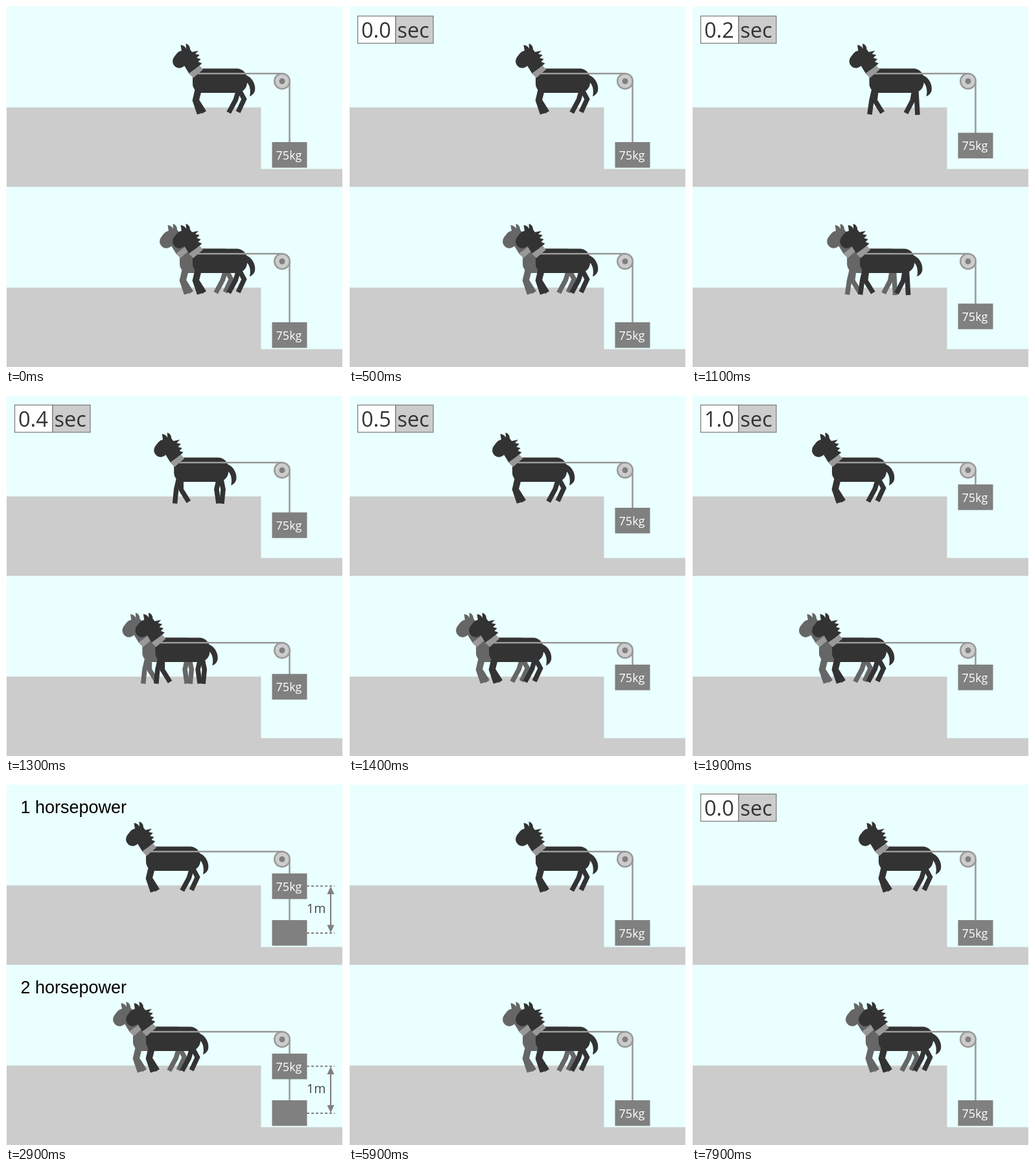
Recreate the animation shown at these times as an HTML page with a canvas. Size 520 by 557 pixels, loop 8 s.

```html
<!DOCTYPE html>
<html lang="en">
<head>
<meta charset="utf-8">
<title>Horsepower</title>
<style>
html, body { margin: 0; width: 100%; height: 100%; overflow: hidden; background: #fff; }
canvas { display: block; width: 520px; height: 557px; }
</style>
</head>
<body>
<canvas id="stage" width="520" height="557"></canvas>
<script>
const ctx = document.getElementById('stage').getContext('2d');
const LOOP = 8000, PANEL = 278, LIFT = 72, STRIDE = 5;
const SANS = '"Open Sans", "Noto Sans", sans-serif';
const ARIAL = '"Liberation Sans", Arial, sans-serif';
const DARK = '#333', MID = '#666', GREY = '#808080', ROPE = '#999', LIGHT = '#ccc', SKY = '#eaffff';

// Joint angle in degrees from straight down; positive swings backwards.
const swing = (mean, reach = 0, lag = 0) => phase => mean + reach * Math.cos(phase - lag);
const LEGS = [
  { hip: 296, thigh: swing(-13), shin: swing(0, 22, 0.57) },
  { hip: 299, thigh: swing(-7, -12, 0.94), shin: swing(32) },
  { hip: 360, thigh: swing(0, -24, 0.8), shin: swing(-8, -22.6, 0.42) },
  { hip: 358, thigh: swing(0, 36, 0.67), shin: swing(-17, -30, 1.3) }];

const HEAD = headShape();
const TAIL = new Path2D('M367 106C380 108 386 122 384 131Q382 137 376 139.5C379 127 374 117 367 115Z');
const COLLAR = new Path2D('M282 104L299 92L304 98L289 111Z');
const BODY = new Path2D();
BODY.roundRect(288, 96.5, 84, 37.5, [10, 16, 16, 14]);

function headShape() {
  const p = new Path2D('M275 92L271 70L269.5 60Q276 61 278 66L277.5 58Q284 60 284 67L287 71');
  for (let i = 0; i < 4; i++) {
    p.lineTo(297 + 1.8 * i, 69 + 6.5 * i);
    p.lineTo(292 + 2.2 * i, 74 + 6 * i);
  }
  p.lineTo(283, 105);
  return p;
}

function rect(x, y, w, h, color) {
  ctx.fillStyle = color;
  ctx.fillRect(x, y, w, h);
}

function line(points, width, color, cap = 'butt') {
  ctx.beginPath();
  for (let i = 0; i < points.length; i += 2) ctx.lineTo(points[i], points[i + 1]);
  ctx.lineWidth = width;
  ctx.strokeStyle = color;
  ctx.lineCap = cap;
  ctx.stroke();
}

function disc(x, y, r, color) {
  ctx.beginPath();
  ctx.arc(x, y, r, 0, Math.PI * 2);
  ctx.fillStyle = color;
  ctx.fill();
}

function text(str, x, y, font, color, align = 'left') {
  ctx.font = font;
  ctx.textAlign = align;
  ctx.fillStyle = color;
  ctx.fillText(str, x, y);
}

function limb(x, y, length, degrees) {
  const a = degrees * Math.PI / 180;
  return [x + length * Math.sin(a), y + length * Math.cos(a)];
}

function drawLeg({ hip, thigh, shin }, phase, color) {
  const knee = limb(hip, 126, 20, thigh(phase));
  line([hip, 126, ...knee, ...limb(...knee, 22, shin(phase))], 7.5, color);
}

function horse(dx, phase, color) {
  ctx.save();
  ctx.translate(dx, 0);
  for (const leg of LEGS) drawLeg(leg, phase, color);
  ctx.fillStyle = color;
  for (const part of [BODY, TAIL, HEAD]) ctx.fill(part);
  disc(277, 76, 9, color);
  line([267.5, 85.2, 272, 79.5], 21, color, 'round');
  ctx.fillStyle = ROPE;
  ctx.fill(COLLAR);
  ctx.restore();
}

function pulley() {
  disc(426, 116, 13, ROPE);
  disc(426, 116, 10.5, LIGHT);
  disc(426, 116, 4.5, GREY);
}

function arrowHead(y, dir) {
  ctx.beginPath();
  ctx.moveTo(501, y);
  ctx.lineTo(495.5, y + 12 * dir);
  ctx.lineTo(506.5, y + 12 * dir);
  ctx.fillStyle = GREY;
  ctx.fill();
}

function weight(y) {
  rect(410.5, y, 54, 39.5, GREY);
}

function measure() {
  weight(210);
  ctx.setLineDash([4, 3]);
  for (const y of [157.5, 230]) line([464, y, 507, y], 2, GREY);
  ctx.setLineDash([]);
  line([501, 166, 501, 222], 2.2, GREY);
  arrowHead(158, 1);
  arrowHead(229.5, -1);
  text('1m', 464, 199, '19.5px ' + SANS, '#444');
}

function panel(top, horses, step, labelled) {
  const done = Math.min(1, step * horses / 10);
  const shift = LIFT * done;
  const phase = done < 1 ? 2 * Math.PI * step / STRIDE : 0;
  const weightY = 210 - shift;
  ctx.save();
  ctx.translate(0, top);
  rect(1, 1, 518, PANEL, SKY);
  rect(1, 156.5, 392.5, PANEL - 155.5, LIGHT);
  rect(393, 251.5, 126, PANEL - 250.5, LIGHT);

  for (let i = horses - 1; i >= 0; i--) horse(-shift - 20 * i, phase, i ? MID : DARK);
  line([437.5, 116, 437.5, labelled ? 211 : weightY + 1], 2.5, ROPE);
  pulley();
  line([296 - shift, 104.3, 427, 104.3], 2.5, ROPE);

  if (labelled) {
    measure();
    text(horses + ' horsepower', 22.5, 45, '27px ' + ARIAL, '#000');
  }
  weight(weightY);
  text('75kg', 436.5, weightY + 26.5, '18px ' + SANS, '#fff', 'center');
  ctx.restore();
}

function timerCell(x, w, color, label, labelX) {
  rect(x, 15.5, w, 42, color);
  ctx.lineWidth = 1.3;
  ctx.strokeStyle = GREY;
  ctx.strokeRect(x, 15.5, w, 42);
  text(label, labelX, 49, '32.5px ' + SANS, DARK);
}

function draw(t) {
  const step = t < 1000 || t >= 5900 ? 0 : Math.min(10, Math.floor((t - 900) / 100));
  const labelled = t >= 2900 && t < 5900;
  rect(0, 0, 520, 557, '#fff');
  panel(0, 1, step, labelled);
  panel(PANEL, 2, step, labelled);
  if ((t >= 500 && t < 2900) || t >= 7900) {
    timerCell(13.5, 58.5, '#fff', (step / 10).toFixed(1), 19);
    timerCell(72, 58, LIGHT, 'sec', 74.5);
  }
}

const start = performance.now();
function frame() {
  draw((performance.now() - start) % LOOP);
  requestAnimationFrame(frame);
}
frame();
</script>
</body>
</html>
```
